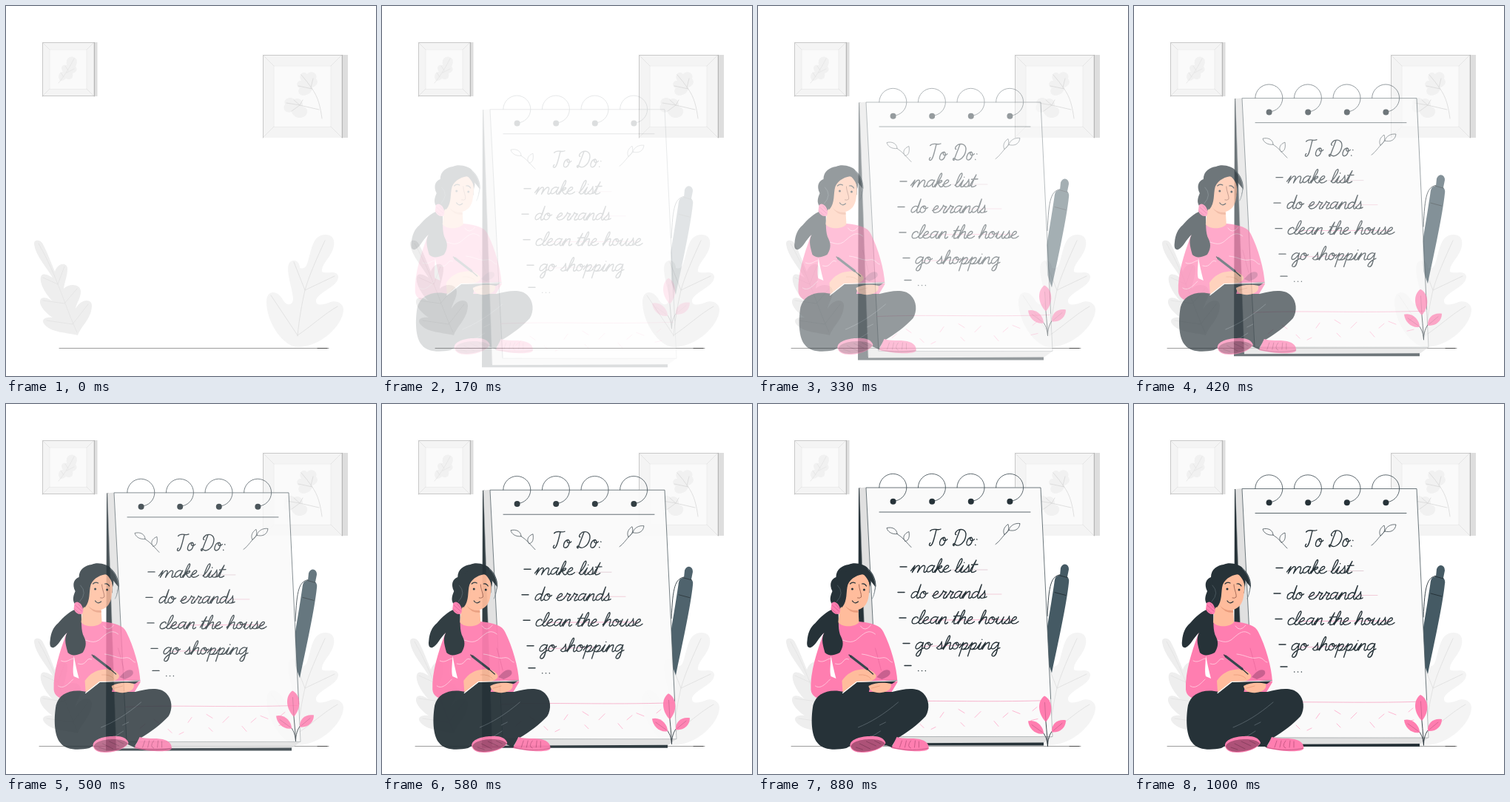
An HTML page with a canvas that plays this animation: 500x500 px, repeating every 1040 ms.

```html
<!DOCTYPE html>
<html lang="en">
<head>
<meta charset="utf-8">
<title>To do list</title>
<style>
html, body { margin: 0; width: 100%; height: 100%; overflow: hidden; background: #fff; }
canvas { display: block; width: 500px; height: 500px; }
</style>
</head>
<body>
<canvas id="stage" role="img" aria-label="To Do: make list, do errands, clean the house, go shopping, ..."></canvas>
<script>
const LOOP = 1040, STEP = 1000 / 24, SHIFT = 30;
const DARK = '#263238', PINK = '#ff7eb0', SKIN = '#ffbc9c';
const dpr = window.devicePixelRatio || 1;
const stage = document.getElementById('stage');
const buffer = document.createElement('canvas');
for (const c of [stage, buffer]) c.width = c.height = 500 * dpr;
const view = stage.getContext('2d');
const layerCtx = buffer.getContext('2d');
let g = view;

function fill(color, d) {
  g.fillStyle = color;
  g.fill(new Path2D(d));
}
function line(color, width, d) {
  g.strokeStyle = color;
  g.lineWidth = width;
  g.lineCap = g.lineJoin = 'round';
  g.stroke(d instanceof Path2D ? d : new Path2D(d));
}
function rect(color, x, y, w, h) {
  g.fillStyle = color;
  g.fillRect(x, y, w, h);
}
function dot(color, x, y, r) {
  g.fillStyle = color;
  g.beginPath();
  g.arc(x, y, r, 0, Math.PI * 2);
  g.fill();
}

// Cursive strokes: [advance, path], baseline at y = 0
const GLYPHS = {
  a: [10, 'M8-8C5-11 1-8 1-4C1 1 5 1 8-7L8.4-9C7-3 7 0 9 0Q10 0 11-2'],
  c: [8, 'M7-7C6-11 1-9 1-4C1 1 6 1 9-3'],
  d: [10, 'M8-7C5-11 1-8 1-4C1 1 5 1 8-7L8.5-18C7-6 7 0 9 0Q10 0 11-2'],
  e: [8, 'M0-3C4-4 7-7 5-9C3-10 1-7 1-4C1 1 6 1 9-3'],
  g: [10, 'M8-8C5-11 1-8 1-4C1 1 5 1 8-7L8.4-9C8 0 10 9 6 9C2 9 4 2 11-2'],
  h: [10, 'M0-2C5-8 6-18 4-18C2-18 2-8 1 0C3-7 5-9 7-9C9-9 6 0 9 0Q10 0 11-2'],
  i: [5, 'M0-2L3-9C2-3 1 0 3 0Q5 0 6-2M3-13l.2.2'],
  k: [9, 'M0-2C5-8 6-18 4-18C2-18 2-8 1 0C3-7 6-10 7-8C7-5 4-5 3-4.5C5-4 5 0 8 0Q9 0 10-2'],
  l: [5, 'M0-2C5-8 6-18 4-18C2-18 1-8 1-3C1 1 4 0 6-2'],
  m: [17, 'M0-2L3-9L2 0C4-7 6-9 7-9C10-9 8-4 8 0C10-7 12-9 13-9C17-9 13 0 16 0Q17 0 18-2'],
  n: [10, 'M0-2L3-9L1.5 0C3-7 5-9 7-9C9-9 6 0 9 0Q10 0 11-2'],
  o: [9, 'M5-9C2-9 1-6 1-4C1 1 7 1 7-5C7-9 4-10 4-7C5-5 8-5 9-7'],
  p: [10, 'M0-2L3-9L2 9M2.6-4C4-9 9-10 8-5C7 0 4 1 3-1M5 0Q9 0 11-2'],
  r: [8, 'M0-2C2-5 3-8 3-10C4-8 5-8 7-8C5-4 4 0 6 0Q8 0 9-2'],
  s: [7, 'M0-2C3-5 4-8 4-10C4-7 7-4 5-1C4 0 2 0 1-1M5-.6Q7-1 8-2'],
  t: [6, 'M0-2L4-16C2-5 1 0 3 0Q5 0 7-2M0-10L7-10.5'],
  u: [10, 'M0-2L2-9C1-3 1 0 3 0C6 0 7-5 8-9C7-3 7 0 9 0Q10 0 11-2'],
  T: [12, 'M-2-16C0-20 7-16 10-18M5-17.5C5-10 6 0 3 0C1 0 1-2 2-3'],
  D: [17, 'M6-17C5-8 4-2 4 0C2 0 2-3 4-2C9 2 15-2 15-9C15-16 9-19 4-17C1-15 1-12 3-12'],
  ':': [4, 'M3-1l.3.3M3-7l.3.3'],
  '.': [4, 'M1 0l.1.1'],
  ' ': [6, '']
};
function script(text, x, y, sx, sy) {
  const path = new Path2D();
  let pen = x;
  for (const ch of text) {
    const [advance, d] = GLYPHS[ch];
    path.addPath(new Path2D(d), new DOMMatrix([sx, 0, -0.27 * sy, sy, pen, y]));
    pen += advance * sx;
  }
  line(DARK, 1.35, path);
}

function frame(x, y, w, h, side, b) {
  rect('#dedede', x + w, y, side, h);
  rect('#f4f4f4', x, y, w, h);
  rect('#fafafa', x + b, y + b, w - 2 * b, h - 2 * b);
  const r = x + w, e = y + h;
  line('#dadada', .6, `M${x} ${y}l${b} ${b}M${r} ${y}l${-b} ${b}M${x} ${e}l${b} ${-b}M${r} ${e}l${-b} ${-b}`);
  line('#e8e8e8', .6, `M${x + b} ${e - b}V${y + b}H${r - b}V${e - b}Z`);
  line('#bdbdbd', .8, `M${x + .5} ${e}V${y + .5}H${r}`);
  line('#a0a0a0', .8, `M${r + .3} ${y + .5}V${e}`);
}

function room(step) {
  rect('#fff', 0, 0, 500, 500);
  frame(49, 49, 70, 73, 4.5, 10);
  line('#bdbdbd', .8, 'M49.5 121.5H119');
  fill('#f1f1f1', 'M73 101C69 94 72 89 77 89C72 82 78 78 82 80C80 72 86 67 91 69C98 71 96 78 94 82C98 86 94 90 90 91C92 98 86 101 81 98Q77 102 73 101Z');
  line('#e2e2e2', .7, 'M71 104C77 97 85 85 92 71M78 96L74 90M84 87L80 81M82 90L92 85');

  frame(347, 66, 107, 112, 8, 15);
  fill('#f1f1f1', 'M397 111C390 107 394 100 399 101C394 92 402 87 407 92C412 86 422 91 419 98C424 104 418 109 414 110C414 120 400 124 396 118Q394 113 397 111Z');
  fill('#f1f1f1', 'M401 136C402 127 395 123 390 126C383 121 374 126 377 133C372 140 380 146 386 143C389 154 405 153 407 144Q408 137 401 136Z');
  line('#d9d9d9', .8, 'M427 152C425 137 422 123 413 111Q407 102 399 93M412 110L415 98M414 112L395 108M423 140L397 134L379 131M397 134L389 127M397 134L386 142M397 134L401 127');

  fill('#eeeeee', 'M38 322C37 315 47 315 50 322C56 333 60 345 66 359C70 346 83 346 83 355C83 365 79 373 78 382C86 374 101 376 101 386C101 395 95 402 94 409C103 394 117 396 116 406C115 423 101 433 97 445C83 441 60 442 51 429C47 422 56 420 63 421C51 413 43 402 47 396C51 392 60 396 65 401C53 390 43 371 48 364C52 360 59 365 63 367C54 352 40 337 38 322Z');
  line('#e2e2e2', .8, 'M96 441C87 422 79 398 70 376C62 355 53 337 44 321M70 376L79 352M70 376L50 367M79 402L96 382M79 402L50 398M90 430L111 403M90 430L55 425');

  fill('#f4f4f4', 'M394 461C374 460 352 427 352 400C352 383 366 384 373 395C379 407 388 405 388 395C387 381 377 356 383 347C389 340 397 345 397 354C400 355 405 355 407 348C413 332 413 309 432 309C446 309 445 324 440 333C435 343 426 350 427 359C433 363 446 356 449 365C450 379 424 385 419 397C418 406 428 404 436 401C446 396 456 402 456 410C456 431 425 461 394 461Z');
  line('#e0e0e0', .9, 'M394 446C396 423 400 402 404 384C410 363 420 341 431 317M404 384L444 365M404 384L389 346M394 445L358 391M394 445C411 434 430 416 448 406');

  line('#858585', .8, `M${step < 5 ? 72 : 45} 462.5H436`);
  line('#444', .9, 'M421 462.5H434');
}

function bigPen() {
  line(DARK, .9, 'M409 232C396 234 393 245 391 288');
  fill('#455a64', 'M409 223Q411 218 415 218Q420 219 420 225L418 235Q421 238 420 243C417 272 406 322 397 365L391 348L390 308C394 284 398 260 401 239Q402 233 408 233Z');
  line(DARK, 1, 'M401 256L416 260M407 233L418 236');
}

function pad() {
  fill(DARK, 'M136 115H139L151 463H135ZM140 459L386 458V463H140Z');
  fill('#e0e0e0', 'M137 115L146 114L163 450L398 451L387 459L149 460Z');
  fill('#fafafa', 'M146 114H382L398 451L163 450Z');
  line('#4a575d', .8, 'M163 450L146 114.5H382L395.6 400');
  line('#8d9498', .6, 'M137 116L149 458M395.6 400L398 451H163');
  line('#4a575d', .9, 'M164 147.5H368');

  for (let i = 0; i < 4; i++) {
    const x = 182.3 + i * 52.6;
    g.beginPath();
    g.arc(x, 114.3, 18.5, Math.PI, Math.PI * 2.5);
    g.strokeStyle = '#37454c';
    g.lineWidth = .8;
    g.stroke();
    dot(DARK, x + .3, 133.3, 4);
  }

  line('#48545a', .8, 'M207 195C202 190 195 181 188 177M188 177C181 178 175 174 174 169C182 167 188 171 188 177M199 187C194 182 198 176 204 174C205 181 204 186 199 187');
  line('#48545a', .8, 'M321 191C327 187 332 178 339 172M339 172C340 166 347 162 354 163C353 171 347 174 339 172M333 178C330 173 333 167 338 164C340 170 338 175 333 178');

  line('#dcc3cd', .8, 'M262 225.5H310');
  line('#efbfd0', .8, 'M235 258.5H329');
  line('#ff9ac1', .8, 'M222 293.5L345 293');
  line('#f5a8c6', .8, 'M222 329L290 327');

  script('To Do:', 229.5, 193, 1.14, 1.25);
  const rows = [['make list', 206, 229, 192, 221.5], ['do errands', 205, 264, 189, 256],
    ['clean the house', 206, 298.5, 191, 290.5], ['go shopping', 211, 333, 196, 325]];
  for (const [text, x, y, dashX, dashY] of rows) {
    script(text, x, y, 1.19, 1.03);
    line(DARK, 1.4, `M${dashX} ${dashY}h9`);
  }
  script('...', 215.5, 362, 1.2, 1);
  line(DARK, 1.4, 'M198 355h9');

  line('#f7a3c2', .8, 'M161 404C230 401 300 405 394 402');
  line('#ffa6c8', .8, 'M219 434l5 5M246 425l5-7M271 414l8 5M274 432l5 5M293 425l8-8M319 430l6 7M338 419l-7 6M344 416l10 4M369 429l9-2M371 416l6-5M240 438l-6 3M200 421l7 5M181 433l7-6');
}

function girl() {
  // Sweater
  fill(PINK, 'M108 293C98 296 90 303 86 313C78 335 69 362 70 386C71 396 80 400 92 398L175 396L187 376C186 355 178 328 168 308C164 299 153 296 135 294Z');
  fill('#fff', 'M97 340C97 350 95 361 97 368L104 371C101 360 99 350 97 340Z');
  line('#e9669b', .7, 'M97 340Q98 330 96 324M157 330Q162 348 165 360');
  line('#ffd5e4', .8, 'M91 315C101 316 101 330 94 333C85 334 88 321 99 319C114 315 120 326 131 319C141 311 147 303 157 311M80 347C88 351 92 343 98 344M76 381C83 386 90 378 96 372M139 338C150 339 158 345 166 343C174 341 176 349 180 349M103 351C115 355 113 341 121 345M137 300Q143 309 151 299');

  // Hair and ponytail
  fill(DARK, 'M101 277C91 280 83 288 76 296C69 302 66 309 65 320C64 327 66 330 70 329C77 326 80 316 88 309C83 318 87 328 89 336C94 341 101 340 109 336C113 330 115 323 111 315C106 306 108 293 107 280Z');
  fill(DARK, 'M99 271C94 265 97 258 99 253C94 243 98 236 104 234C104 223 113 218 121 217C130 213 143 217 147 222C155 229 158 238 158 246L154 262L157 247L150 238L149 255L128 282L106 279Z');
  line('#75838a', .7, 'M147 223C156 231 161 247 153 263');

  // Head
  fill(SKIN, 'M109 277L107 295C112 302 129 302 135 295L134 278C142 276 147 269 148 260C150 249 150 240 145 232C135 227 124 232 118 245C113 249 112 263 115 269Z');
  fill('#e99c7c', 'M116 272Q122 280 134 279V282Q121 282 116 272Z');
  fill(DARK, 'M143 230C134 230 124 235 120 244C117 254 120 266 112 275L103 266L106 235L127 219L144 224Z');
  fill(DARK, 'M137 228C144 231 149 239 150 247Q153 236 144 223Z');
  line('#5f6d74', .6, 'M106 245Q116 255 105 267');
  line(DARK, 1.2, 'M123 243Q126 240 130 242M139 243Q143 242 145 246M126 266Q129 271 134 267');
  line('#8f5545', .8, 'M135 244C135 250 139 257 138 261Q136 263 133 262');
  dot(DARK, 126, 250, 1.5);
  dot(DARK, 142, 251, 1.5);
  fill(PINK, 'M98 269Q102 265 107 271Q112 279 108 284Q100 285 97 277Z');
  line('#d95b8f', .8, 'M99 272L108 280M98 277L105 283M103 270L109 277');

  // Crossed legs
  fill(DARK, 'M115 389C94 384 77 391 73 407C70 424 70 448 79 458C86 468 104 468 118 465L146 449L181 465L188 451C201 443 215 433 225 422C231 412 230 399 222 391C213 382 196 385 180 389L150 389Z');
  line('#66737a', .7, 'M134 437C151 430 168 420 188 403M163 434L171 430M150 451L164 442');
  line('#f7f7f7', .8, 'M180 462L187 451');

  // Shoes
  fill(PINK, 'M123 462C122 454 136 449 149 449C160 448 169 451 171 458C168 465 153 471 139 471C130 471 124 468 123 462Z');
  fill('#ad5278', 'M124 463C125 456 139 453 150 453C160 453 168 455 170 459C164 466 151 470 138 470Q127 470 124 463Z');
  line('#7b3955', .7, 'M131 464l9 3M136 459l14 7M145 456l13 6M156 455l8 4');
  fill(PINK, 'M186 450C195 453 206 451 217 453C226 455 230 460 229 466C226 471 201 470 179 465Z');
  line('#b34d78', .7, 'M179 464C199 469 217 468 229 465M193 455l-3 9M199 455l-2 9M205 455q-6 8 0 10M211 455l-1 9M216 456v8');

  // Hands, notebook and pencil
  fill('#c9608f', 'M159 369C164 363 170 357 176 360C180 365 174 369 166 372Z');
  fill(SKIN, 'M112 374C119 364 127 360 136 359C145 357 153 359 158 366C160 372 152 374 146 376L128 386L113 389Z');
  fill(DARK, 'M113 391L132 376L187 373L180 378L150 382L148 391Z');
  fill(SKIN, 'M148 381C157 376 169 376 178 378C180 385 174 389 165 390C157 391 149 388 148 381Z');
  line('#fff', 1.2, 'M113 390.5L132 375.5L186 374');
  line('#e99c7c', .8, 'M135 366Q146 365 151 371M152 384L163 381');
  line('#37474f', 3.3, 'M124 341L146 358');
  line(DARK, 1.2, 'M146 358L154 365M121.5 339L124 341');
}

function plant() {
  line(DARK, .9, 'M388 415C389 431 391 446 391.5 461M380 437C387 443 391 450 391.5 461M403 435C395 441 392 449 391.5 459');
  fill(PINK, 'M389 428C379 419 376 401 387 393C398 398 400 416 389 428Z');
  fill(PINK, 'M386 444C375 446 366 437 365 427C376 424 386 434 386 444Z');
  fill(PINK, 'M397 442C396 431 405 424 416 426C416 436 408 443 397 442Z');
  line('#c75d88', .7, 'M387.5 402L389 427M370 432L384 442M411 430L399 440');
}

// Timing curve (.36, -.01, .5, 1.38)
function ease(x) {
  const bez = (s, a, b) => 3 * (1 - s) ** 2 * s * a + 3 * (1 - s) * s * s * b + s ** 3;
  let lo = 0, hi = 1;
  for (let i = 0; i < 30; i++) {
    const mid = (lo + hi) / 2;
    if (bez(mid, .36, .5) < x) lo = mid; else hi = mid;
  }
  return bez(lo, -.01, 1.38);
}

function layer(draw, p, dx, dy) {
  const off = SHIFT * (1 - p);
  g = layerCtx;
  g.setTransform(dpr, 0, 0, dpr, 0, 0);
  g.clearRect(0, 0, 500, 500);
  g.translate(dx * off, dy * off);
  draw();
  g = view;
  g.globalAlpha = Math.max(0, Math.min(1, p));
  g.drawImage(buffer, 0, 0, 500, 500);
  g.globalAlpha = 1;
}

const start = performance.now();
function render() {
  const t = Math.max(0, performance.now() - start) % LOOP;
  const step = Math.floor((t + 5.1) / STEP);
  view.setTransform(dpr, 0, 0, dpr, 0, 0);
  g = view;
  room(step);
  if (step > 1) {
    const p = ease(Math.min(1, (step + 1) / 24));
    layer(bigPen, p, 0, 1);
    layer(pad, p, 0, 1);
    layer(girl, p, -1, 0);
    layer(plant, p, 0, -1);
  }
  requestAnimationFrame(render);
}
render();
</script>
</body>
</html>
```
